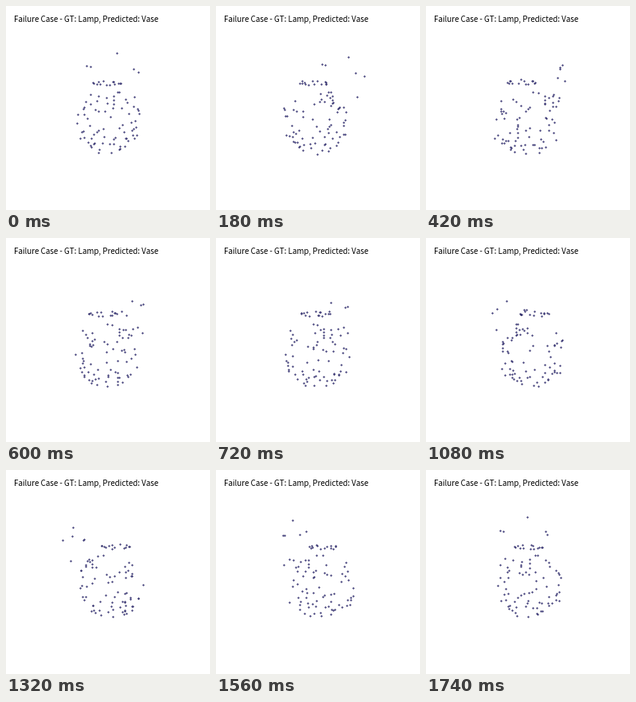
A matplotlib script for the animation above (1.8 s loop, 256 by 256 pixels).

```python
import numpy as np
import matplotlib.pyplot as plt
from matplotlib.animation import FuncAnimation

SIZE = 256
FRAMES = 30
CX, CY = 128, 118      # vanishing point on the stage
DIST = 190             # camera distance in pixels

rng = np.random.default_rng(4)

# Stage position at angle zero, and depth towards the camera.
ANCHORS = np.array([
    (138, 59, 43), (100, 74, 37), (105, 75, 37), (159, 78, 38), (165, 82, 48),
    (160, 113, 40), (88, 146, 5), (89, 135, -5), (165, 130, -5),
    (166, 134, -8), (164, 128, -2), (97, 126, -25), (96, 128, -22),
    (97, 135, -22), (105, 122, 20), (105, 110, 30), (115, 112, 30),
    (125, 114, 25), (134, 112, 20), (139, 107, 12), (141, 107, 5),
    (134, 117, 20), (134, 122, 20), (126, 121, 30), (113, 118, -30),
    (99, 119, 35), (149, 116, -25), (151, 120, -20), (159, 125, -15),
    (133, 127, 34), (144, 127, 31), (153, 134, 27), (111, 129, -30),
    (115, 131, -30), (123, 131, -28), (130, 138, -42), (101, 140, 22),
    (104, 149, 25), (145, 148, 30), (141, 152, 33), (156, 145, 22),
    (161, 143, -22), (159, 153, -20), (162, 151, -20), (158, 161, -20),
    (97, 164, -5), (113, 157, -28), (109, 160, -28),
], float)


def unproject(pts):
    x, y, z = pts.T
    scale = 1 - z / DIST
    return np.column_stack([(x - CX) * scale, (CY - y) * scale, z])


def ring(n, radius, height, center, spread):
    """Points scattered around a horizontal circle."""
    a = (np.arange(n) + rng.uniform(-0.45, 0.45, n)) * 2 * np.pi / n
    r = radius + rng.uniform(-spread, spread, n)
    h = height + rng.uniform(-spread, spread, n)
    return np.column_stack([center[0] + r * np.cos(a), h,
                            center[1] + r * np.sin(a)])


points = np.vstack([
    unproject(ANCHORS),
    ring(14, 17, 22.5, (-2, -9), 1.5),
    ring(12, 36, -43, (0, -3), 3),
    ring(10, 27, -53, (0, -3), 2),
    ring(9, 19, -60, (-3, -3), 1.5),
])


def project(angle):
    x, y, z = points.T
    c, s = np.cos(angle), np.sin(angle)
    scale = 1 / (1 - (z * c - x * s) / DIST)
    return np.column_stack([CX + (x * c + z * s) * scale, CY - y * scale])


fig = plt.figure(figsize=(SIZE / 72, SIZE / 72), dpi=72, facecolor="white")
ax = fig.add_axes([0, 0, 1, 1])
ax.set(xlim=(0, SIZE), ylim=(SIZE, 0))
ax.axis("off")
ax.text(9.5, 20, "Failure Case - GT: Lamp, Predicted: Vase",
        family="Noto Sans CJK JP", size=9.75, color="black", va="baseline")
dots = ax.scatter(*project(0).T, s=2.2, facecolor="#7474c4",
                  edgecolor="#1c1850", linewidth=0.65)


def update(i):
    dots.set_offsets(project(2 * np.pi * i / FRAMES) + 0.5)
    return dots,


anim = FuncAnimation(fig, update, frames=FRAMES, interval=60, repeat=True,
                     repeat_delay=0)
plt.show()
```
